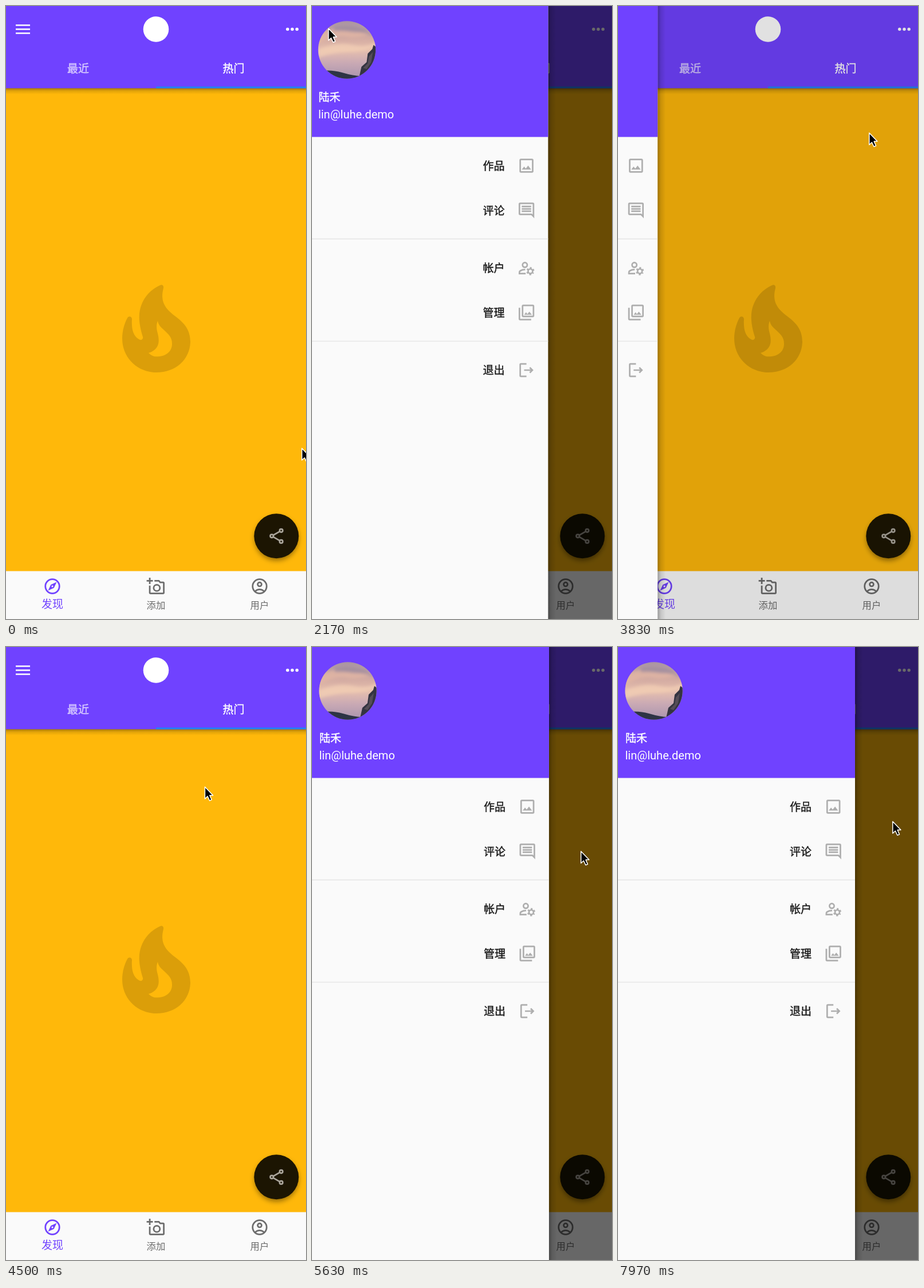
Write an HTML page that moves like this. It is 524x1069 px and loops after 8 s.

```html
<!DOCTYPE html>
<html lang="zh-CN">
<head>
<meta charset="utf-8">
<title>Drawer</title>
<style>
html, body { margin: 0; width: 100%; height: 100%; overflow: hidden; background: #ffb80a; }
svg { display: block; width: 100%; height: 100%; }
text { font-family: "Noto Sans CJK SC", "Noto Sans CJK", "Noto Sans SC", sans-serif; font-size: 19px; fill: currentColor; }
.mid { text-anchor: middle; }
.med { stroke: currentColor; stroke-width: .45; }
.mail { font-family: Roboto, Inter, sans-serif; font-size: 20px; }
.line { fill: none; stroke: currentColor; stroke-width: 2; }
.fill { fill: currentColor; }
.node { fill: #1c1502; stroke: currentColor; stroke-width: 2; }
</style>
</head>
<body>
<svg viewBox="0 0 524 1069" xmlns="http://www.w3.org/2000/svg">
  <defs>
    <linearGradient id="down" x2="0" y2="1">
      <stop offset="0" stop-opacity=".36"/><stop offset=".45" stop-opacity=".12"/><stop offset="1" stop-opacity="0"/>
    </linearGradient>
    <linearGradient id="side">
      <stop offset="0" stop-opacity=".3"/><stop offset=".4" stop-opacity=".11"/><stop offset="1" stop-opacity="0"/>
    </linearGradient>
    <linearGradient id="sky" x2="0" y2="1">
      <stop offset="0" stop-color="#a894a3"/><stop offset=".3" stop-color="#d3aba2"/>
      <stop offset=".5" stop-color="#e6bfae"/><stop offset=".72" stop-color="#c9a9b4"/>
      <stop offset="1" stop-color="#a793ad"/>
    </linearGradient>
    <filter id="soft" x="-30%" y="-30%" width="160%" height="160%"><feGaussianBlur stdDeviation="5"/></filter>
    <filter id="haze" x="-30%" y="-60%" width="160%" height="220%"><feGaussianBlur stdDeviation="2.5"/></filter>
    <clipPath id="round"><circle cx="62.6" cy="76.5" r="50.2"/></clipPath>

    <g id="picture">
      <rect class="line" x="4" y="4" width="16" height="16" rx="1"/>
      <path class="fill" d="M14.14 11.86l-3 3.87L9 13.14 6 17h12z"/>
    </g>
    <g id="comment">
      <path class="line" d="M21 19.6 18.4 17H4q-1 0-1-1V4q0-1 1-1h16q1 0 1 1zM6 7h12M6 10h12M6 13h12"/>
    </g>
    <g id="account">
      <circle class="line" cx="10" cy="8" r="3"/>
      <path class="line" d="M11 19H3v-1.65c0-.7.3-1.3.9-1.67C5.7 14.6 7.8 14 10 14h.4"/>
      <circle class="line" cx="17" cy="16" r="2.9"/>
      <circle class="line" cx="17" cy="16" r="4.2" stroke-dasharray="2.1 2.298" stroke-dashoffset="1.05" transform="rotate(30 17 16)"/>
    </g>
    <g id="gallery">
      <rect class="line" x="7" y="3" width="14" height="14" rx="1"/>
      <path class="line" d="M3 6v14q0 1 1 1h14"/>
      <path class="fill" d="M11.5 11.67l1.69 2.26 2.48-3.1L19 15H9z"/>
    </g>
    <g id="exit">
      <path class="line" d="M12 4H5q-1 0-1 1v14q0 1 1 1h7M9 12h10"/>
      <path class="line" d="M16.3 8.7 19.6 12l-3.3 3.3"/>
    </g>
    <g id="compass">
      <circle class="line" cx="12" cy="12" r="9"/>
      <path class="fill" fill-rule="evenodd" d="M6.5 17.5l7.51-3.49L17.5 6.5 9.99 9.99zM12 10.9a1.1 1.1 0 1 1 0 2.2 1.1 1.1 0 0 1 0-2.2z"/>
    </g>
    <g id="camera">
      <path class="line" d="M10 5h5.6l1.8 2H21q1 0 1 1v12q0 1-1 1H5q-1 0-1-1v-9M0 5h8M4 1v8"/>
      <circle class="line" cx="13" cy="14" r="4"/>
    </g>
    <g id="user">
      <circle class="line" cx="12" cy="12" r="9"/>
      <circle class="line" cx="12" cy="9.5" r="2.5"/>
      <path class="line" d="M6.2 18.2C7.9 16.8 9.9 16 12 16s4.1 .8 5.8 2.2"/>
    </g>
    <g id="share">
      <path class="line" d="M18 5 6 12l12 7"/>
      <circle class="node" cx="18" cy="5" r="2"/>
      <circle class="node" cx="6" cy="12" r="2"/>
      <circle class="node" cx="18" cy="19" r="2"/>
    </g>
  </defs>

  <rect width="524" height="1069" fill="#ffb80a"/>
  <path fill-opacity=".14" fill-rule="evenodd" d="M269 487C273 485 276 488 275 492C271 508 273 519 284 531C297 545 322 553 322 586C321 617 296 639 263 639C229 639 203 613 203 580C203 566 207 553 212 544C214 540 220 541 220 546C219 563 222 575 232 581C236 584 240 581 239 577C231 552 231 534 237 520C243 505 254 494 269 487Z
    M265 549C262 557 263 564 265 571C269 586 267 600 249 605C255 611 261 612 268 611C280 610 290 602 290 589C290 577 283 572 277 566C270 560 266 556 265 549Z"/>

  <rect y="143" width="524" height="11" fill="url(#down)"/>
  <rect width="524" height="143.4" fill="#7042ff"/>
  <rect x="262" y="140.4" width="262" height="3" fill="#2182f5"/>
  <circle id="ripple" cx="29" cy="40.5" fill="#bcbcbc"/>
  <path d="M17 33.5h25M17 40.5h25M17 47.5h25" stroke="#fff" stroke-width="2.7"/>
  <circle cx="262" cy="40.5" r="22.3" fill="#fff"/>
  <g fill="#fff" color="#fff">
    <circle cx="491.8" cy="40.5" r="2.75"/><circle cx="500" cy="40.5" r="2.75"/><circle cx="508.2" cy="40.5" r="2.75"/>
    <text class="mid med" x="126" y="116" opacity=".7">最近</text>
    <text class="mid med" x="397.5" y="116">热门</text>
  </g>

  <rect y="985.5" width="524" height="84" fill="#fafafa"/>
  <g id="nav"></g>

  <circle cx="472.3" cy="929" r="38" fill-opacity=".42" filter="url(#soft)"/>
  <circle cx="472.3" cy="924.3" r="39" fill="#1c1502"/>
  <use href="#share" color="#aaa59b" transform="translate(456.1 908) scale(1.363)"/>

  <rect id="scrim" width="524" height="1069"/>

  <g id="drawer">
    <rect id="shade" x="414" width="14" height="1069" fill="url(#side)"/>
    <rect width="414" height="1069" fill="#fafafa"/>
    <rect width="414" height="228.4" fill="#7042ff"/>
    <g clip-path="url(#round)">
      <rect x="12" y="26" width="102" height="102" fill="url(#sky)"/>
      <g filter="url(#haze)">
        <path d="M10 50q28-14 52-6t54-10v10q-30 14-54 10t-52 14z" fill="#e3b6a4" opacity=".8"/>
        <path d="M12 76q34-14 60-8t42-6v10q-28 8-50 8t-52 10z" fill="#f2cdb5" opacity=".8"/>
        <path d="M40 36q30-6 60 6l10 10q-30-10-70-8z" fill="#9d8b9e" opacity=".7"/>
      </g>
      <path d="M12 114q22-4 42 2t34 6v8H12z" fill="#2d3445"/>
      <path d="M84 124l4-18 9-8 2-15 8-8 2-7 8 6v56H80z" fill="#343441"/>
      <path d="M91 108l8-8 2-12 7-8-3 18-8 12z" fill="#554d57"/>
    </g>
    <g color="#fff">
      <text class="med" x="13" y="166">陆禾</text>
      <text class="mail" x="12.5" y="196">lin@luhe.demo</text>
    </g>
    <path d="M0 406.3H414M0 584.5H414" stroke="#e6e6e6" stroke-width="1.4"/>
    <g id="menu"></g>
  </g>

  <path id="cursor" d="M.8 1.3V22L5.4 17.7 9 25.3 12.6 23.700 9.200 16.100H15Z" stroke="#fff" stroke-width="1.5" stroke-linejoin="round"/>
</svg>
<script>
const LOOP = 8000, FRAME = 100 / 3, WIDTH = 414;
const $ = id => document.getElementById(id);
const clamp = v => Math.min(1, Math.max(0, v));
const smooth = u => u * u * (3 - 2 * u);
const icon = (id, x, y, color) =>
  `<use href="#${id}" color="${color}" transform="translate(${x - 16.36} ${y - 16.36}) scale(1.363)"/>`;

$('menu').innerHTML = [
  ['作品', 'picture', 278.5], ['评论', 'comment', 356.5], ['帐户', 'account', 457],
  ['管理', 'gallery', 534.5], ['退出', 'exit', 635]
].map(([label, id, y]) =>
  icon(id, 376.2, y, '#aeaeae') +
  `<text class="med" x="300" y="${y + 7.2}" color="#1c1c1c">${label}</text>`).join('');

$('nav').innerHTML = [
  ['发现', 'compass', 81, '#7042ff', 19, 1050], ['添加', 'camera', 262, '#6c6c6c', 16.4, 1051],
  ['用户', 'user', 443, '#6c6c6c', 16.4, 1051]
].map(([label, id, x, color, size, y]) =>
  icon(id, x, 1012, color) +
  `<text class="mid" x="${x}" y="${y}" color="${color}" style="font-size:${size}px">${label}</text>`).join('');

const OPEN = 1929, CLOSE = 3729, DRAG = 5022, RELEASE = 5300;

// Pointer moves: start, end, x, y
const moves = [
  [60, 780, 330, 520], [980, 1600, 28, 38], [2650, 3350, 438, 220],
  [4320, 4920, 15, 325], [DRAG, 5360, 469, 355], [5750, 6250, 479, 303]
];

function pointer(t) {
  let x = 516, y = 770;
  for (const [from, to, nx, ny] of moves) {
    const u = smooth(clamp((t - from) / (to - from)));
    x += (nx - x) * u;
    y += (ny - y) * u;
  }
  return [x, y];
}

// Critically damped decay from 1 to 0
function settle(ms) {
  const s = Math.max(0, ms) * 0.032;
  return (1 + s) * Math.exp(-s);
}

const dragged = t => clamp((pointer(t)[0] - 100) / WIDTH);

function openness(t) {
  if (t < OPEN) return 0;
  if (t < CLOSE) return 1 - settle(t - OPEN);
  if (t < DRAG) return settle(t - CLOSE);
  if (t < RELEASE) return dragged(t);
  return 1 - (1 - dragged(RELEASE)) * Math.exp((RELEASE - t) * 0.022);
}

function draw(t) {
  const p = openness(t), [x, y] = pointer(t);
  $('cursor').setAttribute('transform', `translate(${x} ${y})`);
  $('drawer').setAttribute('transform', `translate(${(p - 1) * WIDTH} 0)`);
  $('shade').setAttribute('opacity', clamp(p * 2000));
  $('scrim').setAttribute('opacity', 0.59 * Math.pow(p, 0.9));
  const grow = clamp((t - 1790) / 120), fade = 1 - clamp((t - 1990) / 200);
  $('ripple').setAttribute('r', 14 + 35 * smooth(grow));
  $('ripple').setAttribute('opacity', 0.25 * clamp(grow * 2) * fade);
}

// Hold each picture for a thirtieth of a second, on 10 ms marks
const hold = t => 10 * Math.round(Math.floor((t + 4) / FRAME) * FRAME / 10);

const start = performance.now();
function tick() {
  draw(hold((performance.now() - start) % LOOP));
  requestAnimationFrame(tick);
}
tick();
</script>
</body>
</html>
```
